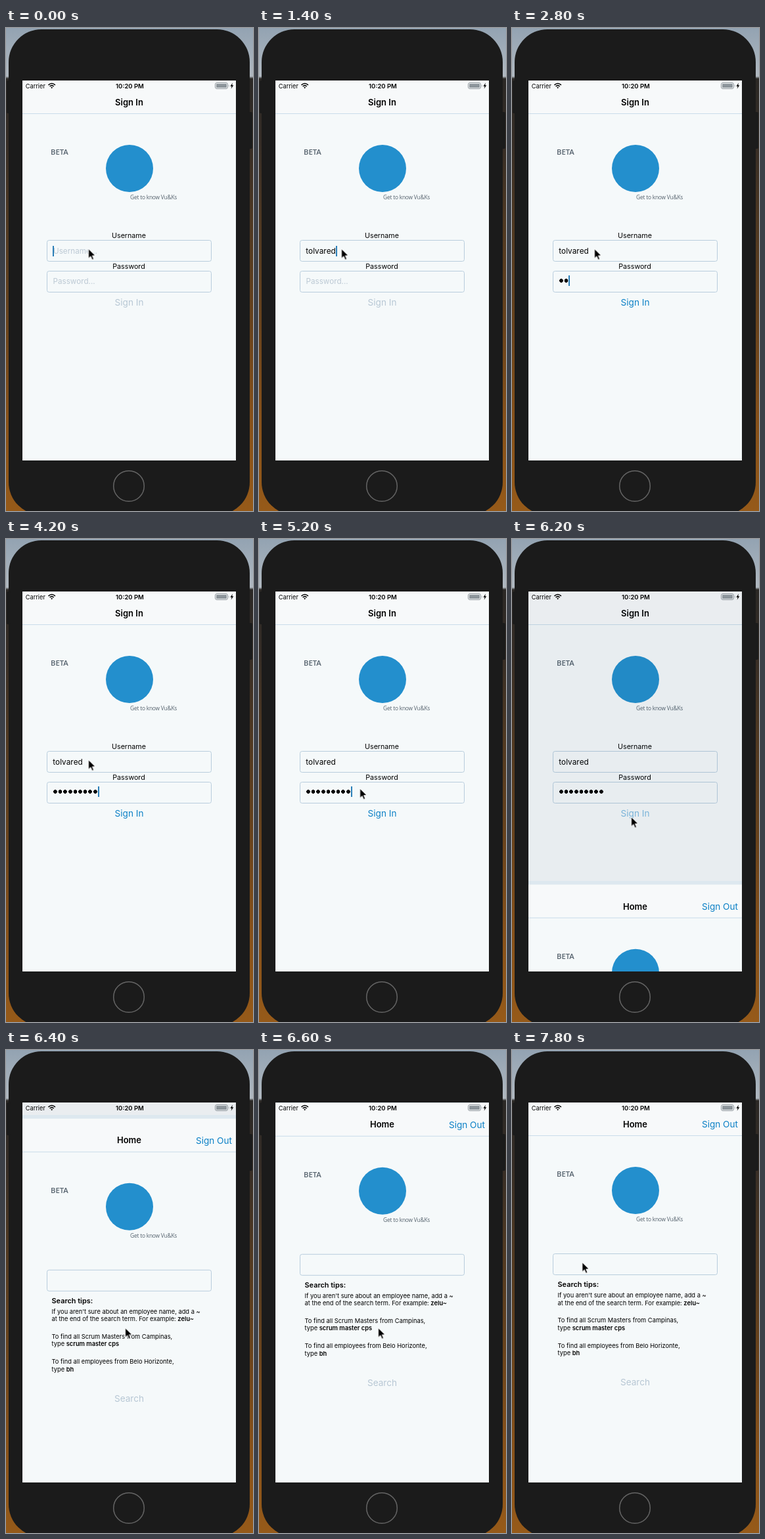
An HTML page for the animation above (8000 ms loop, 376x736 px).

```html
<!DOCTYPE html>
<html lang="en">
<head>
<meta charset="utf-8">
<title>Sign in to home</title>
<style>
html, body { margin: 0; width: 100%; height: 100%; overflow: hidden; background: #1b1b1b; }
svg { display: block; }
text, .typed { font-family: Inter, Roboto, sans-serif; }
text { white-space: pre; }
.mid { text-anchor: middle; }
.title { font-size: 13px; font-weight: 600; }
.label { font-size: 10.7px; }
.hint { font-size: 11.7px; fill: #bcc9d4; }
.button { font-size: 13.6px; fill: #0b80c6; }
.off { fill: #b7c7d4; }
.status { font-size: 9.2px; }
.tips { font-size: 9.3px; }
.bold { font-weight: 600; }
.logo text { font-family: "Open Sans", "Noto Sans", sans-serif; fill: #55626d; }
.field { fill: none; stroke: #b8cddd; }

.typed { display: flex; align-items: center; height: 32px; font-size: 11.8px; line-height: 16px; color: #000; }
.typed i { font-style: normal; max-width: 0; overflow: hidden; }
.typed b { width: 1.5px; height: 16px; flex: none; background: #2b7fb8; }
.user i { animation: letter 8s step-end calc(.2s + var(--i) * .17s) infinite; }
.pass i { width: 7.6px; height: 8px; background: radial-gradient(circle, #000 2.6px, #0000 3.1px);
  animation: dot 8s step-end calc(2.6s + var(--i) * .15s) infinite; }
.user b { animation: userCaret 8s step-end infinite; }
.pass b { animation: passCaret 8s step-end infinite; }
.userHint { animation: userHint 8s step-end infinite; }
.passHint { animation: passHint 8s step-end infinite; }
.submit { animation: submit 8s linear infinite; }
.dim { fill: #1c3d52; animation: dim 8s linear infinite; }
.home { animation: rise 8s linear infinite; }
.pointer { animation: point 8s infinite; }

@keyframes letter { 0% { max-width: 2em } 80%, to { max-width: 0 } }
@keyframes dot { 0% { max-width: 2em } 50%, to { max-width: 0 } }
@keyframes userCaret { 0% { opacity: 1 } 23.75%, to { opacity: 0 } }
@keyframes passCaret {
  0% { opacity: 0 } 25% { opacity: 1 } 53.75% { opacity: 0 }
  60% { opacity: 1 } 66.25%, to { opacity: 0 }
}
@keyframes userHint { 0% { opacity: 1 } 2.5%, to { opacity: 0 } }
@keyframes passHint { 0% { opacity: 1 } 32.5%, to { opacity: 0 } }
@keyframes submit {
  0%, 32.49% { fill: #b7c7d4 }
  32.5%, 72.5% { fill: #0b80c6 }
  74%, 75.5% { fill: #c9d9e5 }
  77.5% { fill: #80bae0 }
  80%, to { fill: #0b80c6 }
}
@keyframes dim { 0%, 76.9% { opacity: 0 } 77.5%, to { opacity: .06 } }
/* critically damped slide-up */
@keyframes rise {
  0%, 76.92% { transform: translateY(590px) }
  77.52% { transform: translateY(445px) }
  78.13% { transform: translateY(245px) }
  78.75% { transform: translateY(120px) }
  79.4% { transform: translateY(56px) }
  80% { transform: translateY(25px) }
  81.25% { transform: translateY(4.5px) }
  82.5% { transform: translateY(.8px) }
  85%, to { transform: none }
}
@keyframes point {
  0%, 60% { transform: translate(125.5px, 336.5px); animation-timing-function: ease-in-out }
  70%, 88% { transform: translate(181.5px, 423.5px); animation-timing-function: ease-in-out }
  96.5%, to { transform: translate(106.8px, 323.5px) }
}
</style>
</head>
<body>
<svg width="376" height="736" viewBox="0 0 376 736">
  <defs>
    <linearGradient id="scene" x2="0" y2="1">
      <stop offset="0" stop-color="#93a3b2"/>
      <stop offset=".1" stop-color="#b0b8c0"/>
      <stop offset=".105" stop-color="#2b2825"/>
      <stop offset=".24" stop-color="#362d26"/>
      <stop offset=".4" stop-color="#4e3822"/>
      <stop offset=".62" stop-color="#69431c"/>
      <stop offset=".8" stop-color="#85501a"/>
      <stop offset="1" stop-color="#965a19"/>
    </linearGradient>
    <clipPath id="screen"><rect x="25" y="80" width="325" height="579"/></clipPath>
    <g id="page">
      <rect x="25" y="80" width="325" height="579" fill="#f5f9fa"/>
      <rect x="25" y="80" width="325" height="50" fill="#f7f9fa"/>
      <path d="M25 130.5h325" stroke="#c9dcea"/>
      <g class="logo">
        <circle cx="188" cy="214" r="36" fill="#238fcd"/>
        <text x="68" y="193" font-size="11.3" font-weight="600">BETA</text>
        <text x="189" y="261" font-size="8.4" letter-spacing="-.2">Get to know Vu&amp;Ks</text>
      </g>
    </g>
  </defs>

  <rect width="376" height="736" fill="url(#scene)"/>
  <rect x="4" y="2" width="367" height="740" rx="50" fill="#1b1b1b"/>
  <rect x="1" y="80" width="6" height="50" rx="2" fill="#1b1b1b"/>
  <rect x="368" y="128" width="7" height="56" rx="2" fill="#1b1b1b"/>
  <circle cx="187" cy="698" r="23.3" fill="none" stroke="#646464" stroke-width="1.5"/>

  <g clip-path="url(#screen)">
    <use href="#page"/>
    <text class="title mid" x="187.5" y="117.7">Sign In</text>
    <text class="label mid" x="187" y="320.3">Username</text>
    <rect class="field" x="62.5" y="323.5" width="250" height="32" rx="3"/>
    <text class="hint userHint" x="72" y="344">Username...</text>
    <foreignObject x="71.2" y="323.5" width="230" height="32">
      <div class="typed user" data-text="tolvared"></div>
    </foreignObject>
    <text class="label mid" x="187" y="367">Password</text>
    <rect class="field" x="62.5" y="370.5" width="250" height="32" rx="3"/>
    <text class="hint passHint" x="71.5" y="390.3">Password...</text>
    <foreignObject x="71.2" y="369.2" width="230" height="32">
      <div class="typed pass" data-text="         "></div>
    </foreignObject>
    <text class="button submit mid" x="187.5" y="422.7">Sign In</text>
    <rect class="dim" x="25" y="80" width="325" height="579"/>

    <g class="home">
      <rect x="25" y="74" width="325" height="8" fill="#dde8ef"/>
      <use href="#page"/>
      <text class="title mid" x="187.5" y="117.7">Home</text>
      <text class="button" x="344" y="118" text-anchor="end">Sign Out</text>
      <rect class="field" x="62.5" y="310.5" width="250" height="32" rx="3"/>
      <text class="bold" x="69.5" y="361" font-size="10.9">Search tips:</text>
      <g class="tips">
        <text x="69.5" y="377">If you aren't sure about an employee name, add a ~</text>
        <text x="69.5" y="388.5">at the end of the search term. For example: <tspan class="bold">zelu~</tspan></text>
        <text x="69.5" y="415.2">To find all Scrum Masters from Campinas,</text>
        <text x="69.5" y="426.7">type <tspan class="bold">scrum master cps</tspan></text>
        <text x="69.5" y="453.5">To find all employees from Belo Horizonte,</text>
        <text x="69.5" y="465">type <tspan class="bold">bh</tspan></text>
      </g>
      <text class="button off mid" x="187.5" y="510.8">Search</text>
    </g>

    <g class="status">
      <text x="29.8" y="91.5">Carrier</text>
      <text class="bold mid" x="188.5" y="91.6" font-size="9.5">10:20 PM</text>
      <g fill="none" stroke="#000" stroke-width="1.6">
        <path d="M64.5 86.8q5.2-4.6 10.4 0M66.6 89q3.1-2.6 6.2 0"/>
        <path d="M69.7 92.3l-1.6-1.8q1.6-1.1 3.2 0z" fill="#000" stroke="none"/>
      </g>
      <rect x="318.5" y="83.5" width="19" height="9" rx="2.5" fill="none" stroke="#8d959b"/>
      <rect x="320" y="85" width="16" height="6" rx="1" fill="#8d959b"/>
      <path d="M339 86.3q1.6 1.7 0 3.4z" fill="#8d959b"/>
      <path d="M345 83.5l-3.6 5.2h2.2l-1 4 3.7-5.4h-2.2z"/>
    </g>
  </g>

  <path class="pointer" d="M0 0V14.6L3.4 11.4 5.7 16.7 8.2 15.6 5.9 10.5H10.6Z" stroke="#fff" stroke-width="1" stroke-linejoin="round"/>
</svg>
<script>
// Split each field into timed characters followed by its caret.
for (const field of document.querySelectorAll('.typed')) {
  [...field.dataset.text].forEach((char, i) => {
    const key = document.createElement('i');
    key.textContent = char;
    key.style.setProperty('--i', i);
    field.append(key);
  });
  field.append(document.createElement('b'));
}
</script>
</body>
</html>
```
